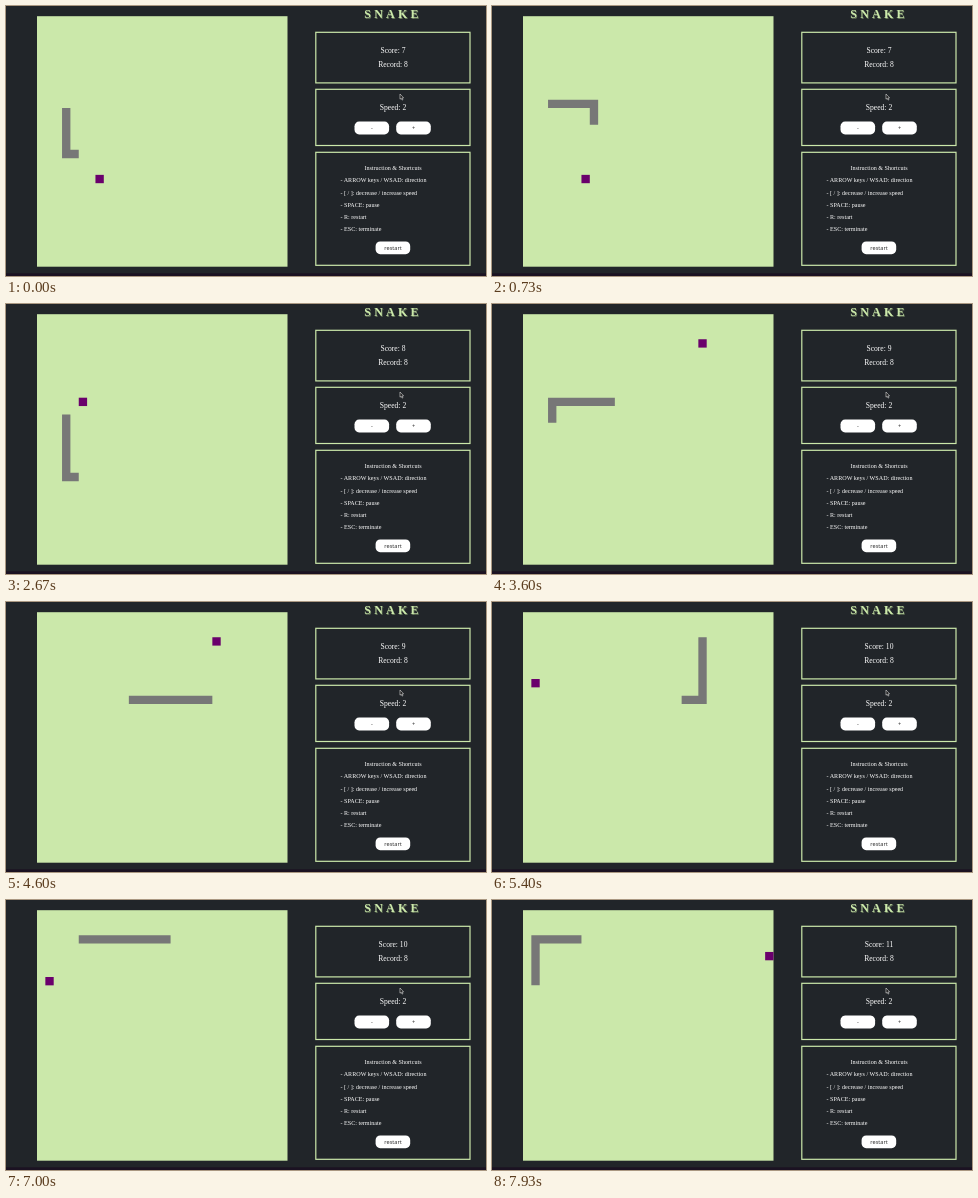
Recreate the animation shown at these times as an HTML page. Size 480 by 270 pixels, loop 8000 ms.

```html
<!DOCTYPE html>
<html lang="en">
<head>
<meta charset="utf-8">
<title>Snake</title>
<style>
  html, body { margin: 0; width: 100%; height: 100%; overflow: hidden; background: #212529; }
  svg { display: block; width: 480px; height: 270px; }
  text { font-family: "Liberation Serif", serif; fill: #fff; }
  .title { font-size: 12px; font-weight: bold; letter-spacing: 3.2px; fill: #cbe8aa; text-shadow: .8px .6px 0 #66785a; }
  .info { font-size: 7.6px; text-anchor: middle; }
  .help { font-size: 6.1px; }
  .mid { text-anchor: middle; }
  .panel { fill: none; stroke: #cbe8aa; stroke-width: 1.2; }
  .button { fill: #fff; }
  .label { font: 5.6px "Open Sans", sans-serif; fill: #222; text-anchor: middle; }
  #snake { fill: none; stroke: #777; stroke-width: 8.35; stroke-linecap: square; stroke-linejoin: miter; }
</style>
</head>
<body>
<svg viewBox="0 0 480 270">
  <rect width="480" height="270" fill="#212529"/>
  <rect y="267.3" width="480" height="2.7" fill="#1b1222"/>
  <rect x="31" y="10.2" width="250.5" height="250.5" fill="#cbe8aa"/>
  <rect id="food" width="8.35" height="8.35" fill="#6a006c"/>
  <polyline id="snake"/>

  <text class="title" x="358.3" y="12.4">SNAKE</text>

  <rect class="panel" x="309.8" y="26.3" width="154.2" height="50.6"/>
  <text class="info" x="387" y="47" id="score">Score: 7</text>
  <text class="info" x="387" y="61.4">Record: 8</text>

  <rect class="panel" x="309.8" y="83.3" width="154.2" height="56.2"/>
  <text class="info" x="387" y="103.8">Speed: 2</text>
  <rect class="button" x="348.5" y="115.6" width="34.6" height="12.8" rx="4.6"/>
  <rect class="button" x="390.2" y="115.6" width="34.6" height="12.8" rx="4.6"/>
  <text class="label" x="366" y="124">-</text>
  <text class="label" x="407.6" y="124">+</text>

  <rect class="panel" x="309.8" y="146.3" width="154.2" height="113"/>
  <text class="help mid" x="387" y="164.2">Instruction &amp; Shortcuts</text>
  <text class="help" x="334.5" y="176.3">- ARROW keys / WSAD: direction</text>
  <text class="help" x="334.5" y="188.5">- [ / ]: decrease / increase speed</text>
  <text class="help" x="334.5" y="200.7">- SPACE: pause</text>
  <text class="help" x="334.5" y="212.9">- R: restart</text>
  <text class="help" x="334.5" y="225">- ESC: terminate</text>
  <rect class="button" x="369.6" y="235.5" width="34.6" height="12.7" rx="4.6"/>
  <text class="label" x="387" y="243.9">restart</text>

  <path d="M394 88v5.2l1.2-1 .9 1.9 .8-.4-.9-1.8h1.6z" fill="#111" stroke="#ddd" stroke-width=".6"/>
</svg>
<script>
  const LOOP = 8000, CELL = 8.35, LEFT = 31, TOP = 10.2;
  const ROUTE = 'L1 U6 R5 D9 L5 U9 R18 U7 L20 D5';
  const STEP = { L: [-1, 0], R: [1, 0], U: [0, -1], D: [0, 1] };
  const MEALS = [0, 16, 31, 54, 79];
  const FOODS = [
    { at: 0, x: 7, y: 19 },
    { at: 1530, x: 5, y: 10 },
    { at: 3130, x: 21, y: 3 },
    { at: 5400, x: 1, y: 8 },
    { at: 7930, x: 29, y: 5 }
  ];

  const snake = document.getElementById('snake');
  const food = document.getElementById('food');
  const score = document.getElementById('score');

  const path = [[4, 16]];
  for (const run of ROUTE.split(' ')) {
    const [dx, dy] = STEP[run[0]];
    for (let i = +run.slice(1); i > 0; i--) {
      const [x, y] = path[path.length - 1];
      path.push([x + dx, y + dy]);
    }
  }

  // Two moves per 200 ms; the second one slips later after 2.7 s.
  function movesAt(t) {
    const r = t % 200;
    return 2 * Math.floor(t / 200) + (r >= 70) + (t < 2700 && r >= 130);
  }

  const center = ([x, y]) =>
    `${(LEFT + (x + .5) * CELL).toFixed(2)},${(TOP + (y + .5) * CELL).toFixed(2)}`;

  function draw(t) {
    const moves = Math.min(movesAt(t), 79);
    const length = 7 + MEALS.filter(m => m < moves).length;
    const end = moves + 7;
    snake.setAttribute('points', path.slice(end - length < 0 ? 0 : end - length, end).map(center).join(' '));

    const eaten = FOODS.filter(f => f.at <= t).length - 1;
    food.setAttribute('x', LEFT + FOODS[eaten].x * CELL);
    food.setAttribute('y', TOP + FOODS[eaten].y * CELL);
    score.textContent = `Score: ${7 + eaten}`;
  }

  const start = performance.now();
  function tick() {
    draw((performance.now() - start) % LOOP);
    requestAnimationFrame(tick);
  }
  tick();
</script>
</body>
</html>
```
